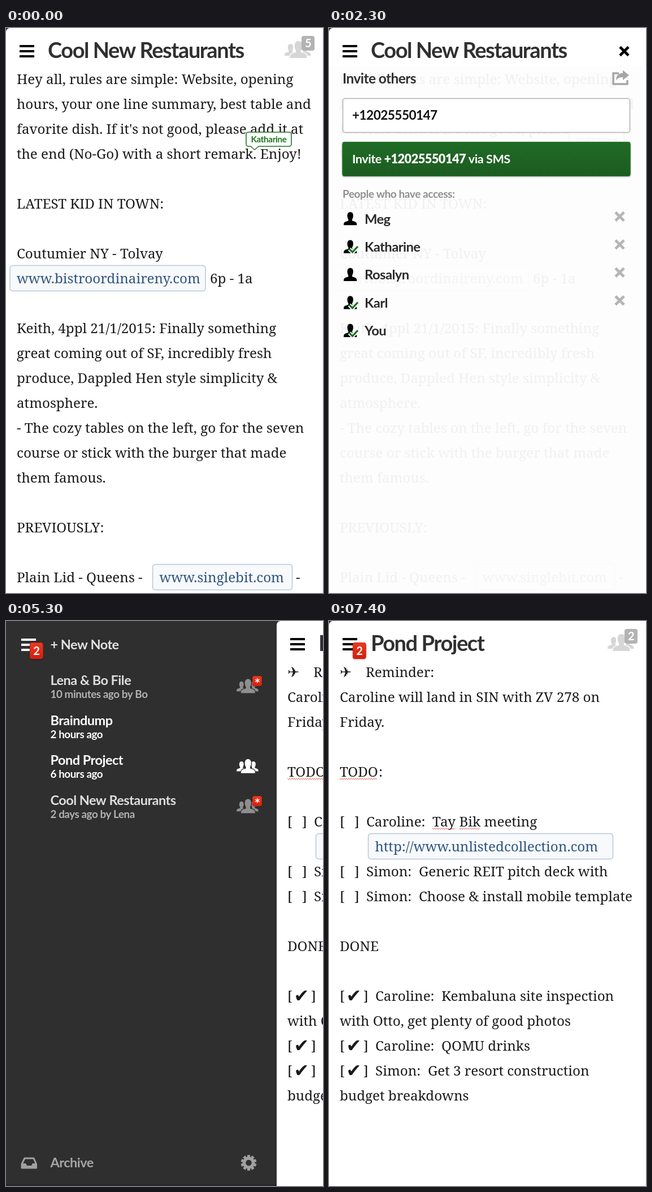
Write an HTML page with a canvas that moves like this. It is 561x998 px and loops after 8000 ms.

```html
<!DOCTYPE html>
<html lang="en">
<head>
<meta charset="utf-8">
<title>Shared notes</title>
<style>
html, body { margin: 0; width: 100%; height: 100%; overflow: hidden; background: #fff; }
canvas { display: block; width: 561px; height: 998px; }
</style>
</head>
<body>
<canvas id="stage"></canvas>
<script>
const W = 561, H = 998, LOOP = 8000;
const INK = '#1a1a1a', TITLE = '#303030', DARK = '#2f2f2f', LINK = '#30557f';
const SERIF = '"Noto Serif", serif', SANS = 'Lato, "Open Sans", sans-serif';
const canvas = document.getElementById('stage');
const ctx = canvas.getContext('2d');
const ratio = window.devicePixelRatio || 1;
canvas.width = Math.round(W * ratio);
canvas.height = Math.round(H * ratio);

function serif(str, x, y, color = INK) {
  ctx.font = `24.2px ${SERIF}`;
  ctx.letterSpacing = '0px';
  ctx.fillStyle = color;
  ctx.fillText(str, x, y);
  return ctx.measureText(str).width;
}

function sans(str, x, y, size, color, { weight = 700, align = 'left', tracking = -0.022 } = {}) {
  ctx.font = `${weight} ${size}px ${SANS}`;
  ctx.letterSpacing = `${size * tracking}px`;
  ctx.fillStyle = color;
  ctx.textAlign = align;
  ctx.fillText(str, x, y);
  ctx.textAlign = 'left';
  return ctx.measureText(str).width;
}

function symbol(str, x, y, size) {
  ctx.font = `${size}px "DejaVu Sans", sans-serif`;
  ctx.letterSpacing = '0px';
  ctx.fillStyle = INK;
  ctx.fillText(str, x, y);
}

function box(x, y, w, h, r, fill, stroke, line = 1.5) {
  ctx.beginPath();
  ctx.roundRect(x, y, w, h, r);
  ctx.fillStyle = fill;
  ctx.fill();
  if (stroke) {
    ctx.strokeStyle = stroke;
    ctx.lineWidth = line;
    ctx.stroke();
  }
}

function polyline(points, color, width) {
  ctx.beginPath();
  points.forEach(([x, y]) => ctx.lineTo(x, y));
  ctx.strokeStyle = color;
  ctx.lineWidth = width;
  ctx.stroke();
}

function shade(y0, y1, top, bottom) {
  const g = ctx.createLinearGradient(0, y0, 0, y1);
  g.addColorStop(0, top);
  g.addColorStop(1, bottom);
  return g;
}

function raised(drawShape) {
  ctx.save();
  ctx.shadowColor = 'rgba(0,0,0,.35)';
  ctx.shadowBlur = 3;
  ctx.shadowOffsetY = 1;
  drawShape();
  ctx.restore();
}

const row = i => 99 + 44 * i;

function chip(url, x, y, w) {
  box(x + 0.5, y + 0.5, w - 1, 45, 5, '#f7f9fb', '#bac6da');
  serif(url, x + 12.5, y + 32, LINK);
}

function squiggle(x, y, w) {
  ctx.beginPath();
  for (let d = 0; d <= w; d += 2) ctx.lineTo(x + d, y + (d % 4 ? 1 : -1));
  ctx.strokeStyle = '#e0584e';
  ctx.lineWidth = 1;
  ctx.stroke();
}

function bars(x, y, color) {
  for (let i = 0; i < 3; i++) box(x, y + 9 * i, 26, 4, 0.5, color);
}

function cross(x, y, r, color, width) {
  polyline([[x - r, y - r], [x + r, y + r]], color, width);
  polyline([[x + r, y - r], [x - r, y + r]], color, width);
}

// Bust inside a 24 x 24 box
function bust(x, y, scale, color, outline) {
  ctx.save();
  ctx.translate(x, y);
  ctx.scale(scale, scale);
  ctx.beginPath();
  ctx.moveTo(0, 24);
  ctx.bezierCurveTo(0, 18, 2, 18, 8.5, 16);
  ctx.lineTo(8.5, 13.5);
  ctx.bezierCurveTo(6, 10, 5, 0, 12, 0);
  ctx.bezierCurveTo(19, 0, 18, 10, 15.5, 13.5);
  ctx.lineTo(15.5, 16);
  ctx.bezierCurveTo(22, 18, 24, 18, 24, 24);
  ctx.closePath();
  if (outline) {
    ctx.strokeStyle = outline;
    ctx.lineWidth = 2.4;
    ctx.stroke();
  }
  ctx.fillStyle = color;
  ctx.fill();
  ctx.restore();
}

function group(x, y, scale, color, bg) {
  ctx.save();
  ctx.translate(x, y);
  ctx.scale(scale, scale);
  bust(0, 5, 0.88, color);
  bust(25.5, 5, 0.88, color);
  bust(9.5, 0, 1.25, color, bg);
  box(6, 30.5, 35, 2, 1, bg);
  ctx.restore();
}

function greyBadge(n) {
  box(523, 14, 23, 26, 4, '#b3b3b3');
  sans(n, 534.5, 34, 20, '#fff', { align: 'center' });
}

function redBadge(x, y, w, h, label, size, baseline) {
  raised(() => box(x, y, w, h, 4, shade(y, y + h, '#ee3a20', '#d51c0c')));
  box(x + 0.5, y + 0.5, w - 1, h - 1, 4, 'transparent', '#c92a18', 1);
  sans(label, x + w / 2, baseline, size, '#fff', { align: 'center' });
}

const countBadge = () => redBadge(42, 38, 23.5, 29, '2', 20, 60);

function page(x, title) {
  ctx.beginPath();
  ctx.roundRect(x, 0, W - x + 8, H, [7, 0, 0, 0]);
  ctx.fillStyle = '#fff';
  ctx.fill();
  ctx.translate(x, 0);
  bars(24, 30, '#000');
  sans(title, 74, 53, 38, TITLE, { tracking: -0.038 });
  box(560, 8, 1, H, 0, '#eee');
}

function bubble(name, w, color) {
  const x = 425, y = 184, h = 25;
  box(x, y, w, h, 4, '#fff', color, 1.6);
  const tip = [[433, y + h], [440, 215], [447, y + h]];
  polyline(tip, color, 1.6);
  ctx.beginPath();
  tip.forEach(([px, py]) => ctx.lineTo(px, py - 1));
  ctx.fillStyle = '#fff';
  ctx.fill();
  sans(name, x + w / 2, 201.5, 15.2, color, { align: 'center' });
}

const REVIEW = [
  'Hey all, rules are simple: Website, opening',
  'hours, your one line summary, best table and',
  "favorite dish. If it's not good, please add it at",
  'the end (No-Go) with a short remark. Enjoy!',
  '',
  'LATEST KID IN TOWN:',
  '',
  'Coutumier NY - Tolvay',
  '',
  '',
  'Keith, 4ppl 21/1/2015: Finally something',
  'great coming out of SF, incredibly fresh',
  'produce, Dappled Hen style simplicity &',
  'atmosphere.',
  '- The cozy tables on the left, go for the seven',
  'course or stick with the burger that made',
  'them famous.',
  '',
  'PREVIOUSLY:',
  '',
  'Plain Lid - Queens -'
];

function reviewPage() {
  page(0, 'Cool New Restaurants');
  REVIEW.forEach((line, i) => serif(line, 19, row(i)));
  chip('www.bistroordinaireny.com', 6.5, 419, 347);
  serif('6p - 1a', 361, row(8));
  chip('www.singlebit.com', 259, 947, 248);
  serif('-', 513, row(20));
}

function reading() {
  reviewPage();
  group(493, 23, 1, '#d6d6d6', '#fff');
  greyBadge('5');
  bubble('Katharine', 80, '#1c7420');
}

function shareIcon() {
  polyline([[513, 80], [503, 80], [503, 99], [528, 99], [528, 92]], '#a6a6a6', 3.4);
  ctx.beginPath();
  ctx.moveTo(508, 93);
  ctx.bezierCurveTo(508, 83, 513, 80, 520, 79.5);
  ctx.lineTo(520, 74.5);
  ctx.lineTo(531, 83.5);
  ctx.lineTo(520, 92);
  ctx.lineTo(520, 87);
  ctx.bezierCurveTo(514, 86.5, 510, 89, 508, 93);
  ctx.fillStyle = '#a6a6a6';
  ctx.fill();
}

const MEMBERS = [['Meg', false], ['Katharine', true], ['Rosalyn', false], ['Karl', true], ['You', true]];

function inviting() {
  const phone = '+12025550147';
  reviewPage();
  bubble('anonymous', 97, '#555');
  box(0, 66, W, H - 66, 0, 'rgba(253,253,253,.945)');
  cross(522.5, 41, 7.5, '#000', 4.6);

  sans('Invite others', 24, 98, 24.4, TITLE);
  shareIcon();
  box(24.5, 124.5, 508, 60, 4, '#fff', '#b0b0b0');
  sans(phone, 41, 162, 22.5, '#111');

  raised(() => box(23.5, 201, 510, 61, 4, shade(201, 262, '#206b26', '#1c5c20')));
  box(24, 201.5, 509, 60, 4, 'transparent', '#1d7a28', 1);
  let x = 41;
  x += sans('Invite ', x, 239, 21.6, '#fff');
  x += sans(phone, x, 239, 21.6, '#fff', { weight: 900 });
  sans(' via SMS', x, 239, 21.6, '#fff');

  sans('People who have access:', 24, 300, 19, '#8f8f8f');
  MEMBERS.forEach(([name, online], i) => {
    const y = 337 + 49.4 * i;
    bust(26, y - 12, 0.97, '#000');
    if (online) {
      const tick = [[36, y + 4], [41.5, y + 9.5], [51, y - 0.5]];
      polyline(tick, '#fff', 7);
      polyline(tick, '#17751c', 3.2);
    }
    sans(name, 63, y + 8.5, 23.7, '#2a2a2a');
    if (name !== 'You') cross(514.5, y - 4, 7.5, '#b5b5b5', 4.8);
  });
}

function projectPage(x) {
  ctx.save();
  page(x, 'Pond Project');
  symbol('✈', 19, row(0), 25);
  serif('Reminder:', 65, row(0));
  serif('Caroline will land in SIN with ZV 278 on', 19, row(1));
  serif('Friday.', 19, row(2));
  squiggle(19, 279, serif('TODO', 19, row(4)));
  serif(':', 88, row(4));

  const task = (i, who, what, whatX) => {
    serif('[', 19, row(i));
    serif(']', 45, row(i));
    serif(who + ':', 66, row(i));
    if (what) serif(what, whatX, row(i));
  };
  task(6, 'Caroline');
  let end = 183;
  for (const word of ['Tay', 'Bik']) {
    const w = serif(word, end, row(6));
    squiggle(end, 367, w);
    end += w + 6.5;
  }
  serif('meeting', end, row(6));
  chip('http://www.unlistedcollection.com', 69, 375, 434);
  task(8, 'Simon', 'Generic REIT pitch deck with', 159);
  task(9, 'Simon', 'Choose & install mobile template', 159);

  const done = (i, who, what, whatX) => {
    serif('[', 19, row(i));
    symbol('✔', 30.5, row(i) + 2, 32);
    serif(']', 61, row(i));
    serif(who + ':', 82, row(i));
    serif(what, whatX, row(i));
  };
  serif('DONE', 19, row(11));
  done(13, 'Caroline', 'Kembaluna site inspection', 199);
  serif('with Otto, get plenty of good photos', 19, row(14));
  done(15, 'Caroline', 'QOMU drinks', 199);
  done(16, 'Simon', 'Get 3 resort construction', 175);
  serif('budget breakdowns', 19, row(17));
  ctx.restore();
}

function gear(x, y) {
  ctx.save();
  ctx.translate(x, y);
  ctx.fillStyle = '#a0a0a0';
  for (let i = 0; i < 10; i++) {
    ctx.fillRect(-2.5, -13.8, 5, 6);
    ctx.rotate(Math.PI / 5);
  }
  ctx.beginPath();
  ctx.arc(0, 0, 8, 0, 2 * Math.PI);
  ctx.strokeStyle = '#a0a0a0';
  ctx.lineWidth = 5.5;
  ctx.stroke();
  ctx.restore();
}

function tray() {
  ctx.beginPath();
  [[33, 949], [49, 949], [53.5, 959], [53.5, 966], [28, 966], [28, 959]].forEach(p => ctx.lineTo(...p));
  ctx.closePath();
  ctx.strokeStyle = '#a0a0a0';
  ctx.lineWidth = 3;
  ctx.lineJoin = 'round';
  ctx.stroke();
  ctx.lineJoin = 'miter';
  ctx.beginPath();
  [[28, 958], [35, 958], [37, 962], [45, 962], [47, 958], [54, 958], [54, 967], [28, 967]].forEach(p => ctx.lineTo(...p));
  ctx.fillStyle = '#a0a0a0';
  ctx.fill();
}

const NOTES = [
  ['Lena & Bo File', '10 minutes ago by Bo', 'unread'],
  ['Braindump', '2 hours ago', 'own'],
  ['Pond Project', '6 hours ago', 'shared'],
  ['Cool New Restaurants', '2 days ago by Lena', 'unread']
];

function listing() {
  box(0, 995, 479, 3, 0, '#2a262b');
  bars(27, 31, '#fff');
  countBadge();
  sans('+ New Note', 78.5, 50, 23.5, '#e2e2e2');
  NOTES.forEach(([title, info, state], i) => {
    const y = 70.7 * i, unread = state === 'unread';
    sans(title, 78.5, 113 + y, 23.5, unread ? '#dedede' : '#fff');
    sans(info, 78.5, 136 + y, 18.8, unread ? '#b2b2b2' : '#fff');
    if (state !== 'own') group(408, 102.5 + y, 0.83, unread ? '#8e8e8e' : '#fff', DARK);
    if (unread) redBadge(436, 97 + y, 17, 18, '*', 25, 120 + y);
  });
  tray();
  sans('Archive', 78.5, 965, 23.5, '#a6a6a6');
  gear(429.5, 957);
  projectPage(479);
}

function project() {
  projectPage(0);
  countBadge();
  group(493, 23, 1, '#d6d6d6', '#fff');
  greyBadge('2');
}

function draw() {
  const t = performance.now() % LOOP;
  const scene = t < 500 ? reading : t < 3500 ? inviting : t < 6500 ? listing : project;
  ctx.setTransform(ratio, 0, 0, ratio, 0, 0);
  ctx.fillStyle = DARK;
  ctx.fillRect(0, 0, W, H);
  scene();
  requestAnimationFrame(draw);
}
draw();
</script>
</body>
</html>
```
